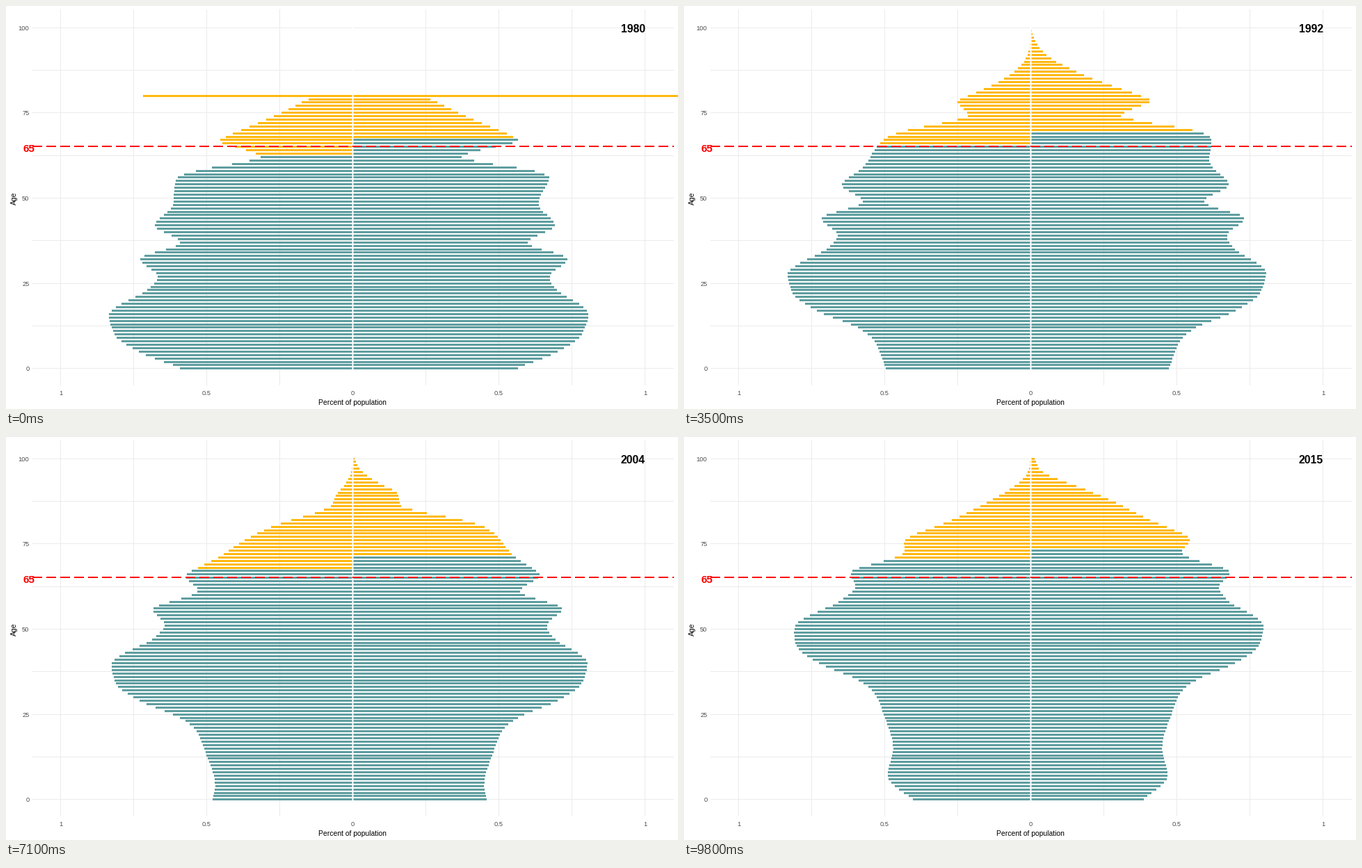
Animation, 966 px wide and 580 px high, one loop 10 s. Source, as a matplotlib script:

```python
import numpy as np
import matplotlib.pyplot as plt
from matplotlib.animation import FuncAnimation
from matplotlib.collections import LineCollection

W, H, DPI = 966, 580, 64
PX = 72 / DPI                       # points per pixel
X0, UNIT, Y0, STEP = 498.5, 419.7, 521.4, 4.909
LEFT, RIGHT, TOP, BOTTOM = 38, 960, 5, 546
TEAL, GOLD, GRID, GREY = "#5F9EA0", "#FFB90F", "#EBEBEB", "#4D4D4D"

# Turning points of the size of each birth year, in pixels.
COHORTS = [
    (1900, 219), (1906, 238), (1913, 273), (1916, 199), (1918, 164),
    (1919, 180), (1922, 260), (1924, 282), (1932, 272), (1938, 292),
    (1943, 252), (1948, 308), (1953, 282), (1957, 297), (1962, 341),
    (1964, 351), (1970, 343), (1975, 308), (1980, 249), (1984, 225),
    (1990, 212), (2000, 198), (2008, 206), (2015, 170)]
# Women per man at birth, by birth year.
RATIO = [(1900, .88), (1911, .99), (1922, 1.057), (1930, 1.0),
         (1953, 1.005), (1964, .965), (1980, .954)]
YEARS = [*range(1980, 2011), 2013, 2014, 2015]
AGES = np.arange(101)


def pixel(v):
    """Centre of the nearest pixel."""
    return np.floor(v + 0.5) + 0.5


def smooth(points, x):
    """Monotone cubic curve through a few points."""
    xs, ys = np.array(points, float).T
    h = np.diff(xs)
    d = np.diff(ys) / h
    m = np.concatenate([d[:1], np.zeros(len(h) - 1), d[-1:]])
    for i in range(1, len(h)):
        if d[i - 1] * d[i] > 0:
            a, b = 2 * h[i] + h[i - 1], h[i] + 2 * h[i - 1]
            m[i] = (a + b) / (a / d[i - 1] + b / d[i])
    x = np.clip(x, xs[0], xs[-1])
    i = np.clip(np.searchsorted(xs, x, side="right") - 1, 0, len(h) - 1)
    t = (x - xs[i]) / h[i]
    s = t * t * (3 - 2 * t)
    bend = t * (1 - t) ** 2 * m[i] - t * t * (1 - t) * m[i + 1]
    return ys[i] * (1 - s) + ys[i + 1] * s + h[i] * bend


def alive(born, age, rate, growth, progress):
    """Share still alive: mortality grows with age, falls by birth year."""
    risk = rate * np.exp(-progress * (born - 1911))
    return np.exp(-risk * np.exp(growth * age))


def pyramid(year):
    born = year - AGES
    size = smooth(COHORTS, born)
    men = size * alive(born, AGES, 0.00125, 0.085, 0.019)
    women = (size * np.interp(born, *zip(*RATIO))
             * alive(born, AGES, 0.000182, 0.1, 0.016))
    count = 101
    if year < 1990:                 # everyone past 79 shares one bar
        count = 81
        men[80] = np.interp(year, [1980, 1985, 1989], [301.5, 349.5, 438.5])
        women[80] = W - X0
    n = year - 1980
    segs, cols = [], []
    for length, sign, old in ((men, -1, 63 + 0.222 * n),
                              (women, 1, 68 + 0.178 * n)):
        for age in range(count):
            y = pixel(Y0 - STEP * age)
            segs.append([(X0, y), (np.round(X0 + sign * length[age]), y)])
            cols.append(GOLD if age >= int(old + 0.5) else TEAL)
    return segs, cols


fig = plt.figure(figsize=(W / DPI, H / DPI), dpi=DPI, facecolor="white")
ax = fig.add_axes([0, 0, 1, 1])
ax.set(xlim=(0, W), ylim=(H, 0))
ax.axis("off")


def line(x, y, color, width, z, **kw):
    ax.plot(x, y, color=color, lw=width * PX, zorder=z, snap=False,
            solid_capstyle="butt", dash_capstyle="butt", **kw)


def text(x, y, s, size, color, **kw):
    kw = {"ha": "center", "va": "baseline", **kw}
    return ax.text(x, y, s, fontsize=size * PX, color=color,
                   family="Liberation Sans", zorder=6, **kw)


for q in range(-4, 5):
    x = np.floor(X0 + q * UNIT / 4) + 0.5
    line([x, x], [TOP, BOTTOM], GRID, 1, 1)
    if q % 2 == 0:
        text(x, 559.5, f"{abs(q) / 4:g}", 9.2, GREY)
for q in range(9):
    y = pixel(Y0 - q * 12.5 * STEP)
    line([LEFT, RIGHT], [y, y], GRID, 1, 1)
    if q % 2 == 0:
        text(33.5, y + 3.5, f"{q * 25 // 2}", 9.2, GREY, ha="right")

bars = LineCollection([], linewidths=3 * PX, zorder=2, snap=False)
ax.add_collection(bars, autolim=False)
line([X0, X0], [TOP, BOTTOM], "white", 2, 3)
line([LEFT, RIGHT], [202, 202], "red", 2, 4, linestyle=(0, (7, 3)))

text(498, 573.5, "Percent of population", 10.4, "black")
text(11.5, 276.5, "Age", 10.4, "black", rotation=90, va="center")
text(33, 209.5, "65", 15.2, "red", weight="bold")
label = text(919, 37.5, "", 15.7, "black", weight="bold", ha="right")


def draw(i):
    year = YEARS[(i + 1) // 3]
    segs, cols = pyramid(year)
    bars.set_segments(segs)
    bars.set_color(cols)
    label.set_text(str(year))
    return bars, label


anim = FuncAnimation(fig, draw, frames=100, interval=100,
                     repeat=True, repeat_delay=0)
plt.show()
```
